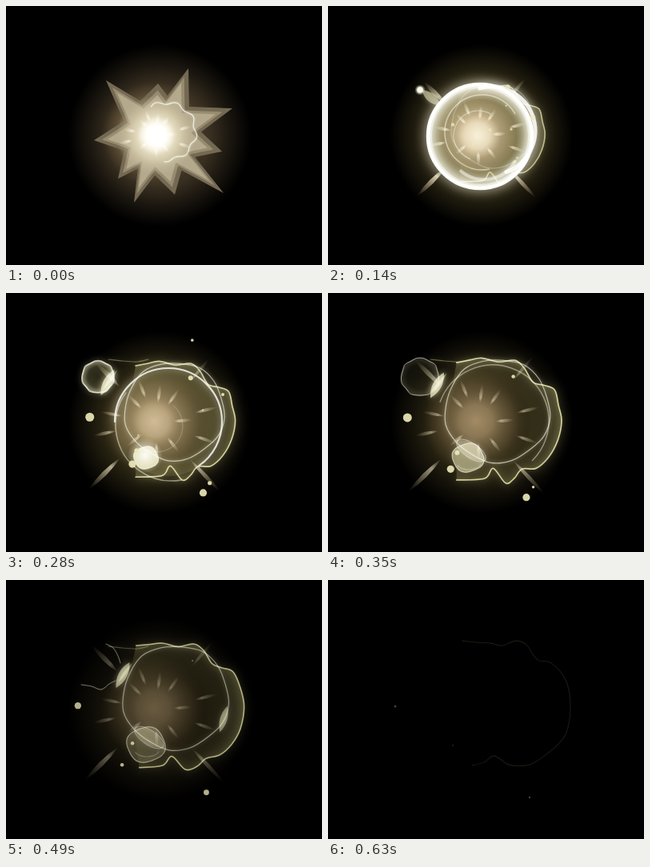
Recreate the animation shown at these times as an HTML page with a canvas. Size 395x324 px, loop 0.7 s.

```html
<!DOCTYPE html>
<html lang="en">
<head>
<meta charset="utf-8">
<title>Burst</title>
<style>
html, body { margin: 0; width: 100%; height: 100%; overflow: hidden; background: #000; }
canvas { display: block; }
</style>
</head>
<body>
<canvas id="stage" width="395" height="324"></canvas>
<script>
const g = document.getElementById('stage').getContext('2d');
const CX = 187, CY = 162, STEP = 70, STEPS = 10, TAU = Math.PI * 2;
const WHITE = '255,255,245', PALE = '245,242,205', OLIVE = '178,176,108', TAN = '205,175,130';
// Strength per step of the light and of the membrane
const FADE = [1, 1, 1, .92, .84, .72, .6, .43, .13, 0];
const LIVE = [0, 0, .75, .85, .95, .95, .9, .72, .22, 0];

const rad = d => d * Math.PI / 180;
const lerp = (a, b, t) => a + (b - a) * t;
const clamp = v => Math.min(1, Math.max(0, v));
const ramp = (k, a, b) => clamp((k - a) / (b - a));
const rgba = (c, a) => `rgba(${c},${Math.max(0, a)})`;
const around = (pts, s) => pts.map(([x, y]) => [CX + (x - CX) * s, CY + (y - CY) * s]);

// Points on a wavy ellipse, angles in degrees
function blob(x, y, rx, ry, amp, waves, from = 0, span = 360, n = 18) {
  return Array.from({ length: n }, (_, i) => {
    const a = rad(from + span * i / n), q = 1 + amp * Math.sin(waves * a);
    return [x + rx * q * Math.cos(a), y + ry * q * Math.sin(a)];
  });
}
function trace(pts, closed) {
  const n = pts.length;
  const p = i => closed ? pts[(i + n) % n] : pts[Math.min(n - 1, Math.max(0, i))];
  g.moveTo(...pts[0]);
  for (let i = 0; i < (closed ? n : n - 1); i++) {
    const [a, b, c, d] = [p(i - 1), p(i), p(i + 1), p(i + 2)];
    g.bezierCurveTo(b[0] + (c[0] - a[0]) / 6, b[1] + (c[1] - a[1]) / 6,
      c[0] - (d[0] - b[0]) / 6, c[1] - (d[1] - b[1]) / 6, c[0], c[1]);
  }
  if (closed) g.closePath();
}
function glowStroke(path, color, alpha, width, blur) {
  if (alpha <= 0) return;
  g.save();
  g.lineWidth = width;
  g.lineCap = 'round';
  g.strokeStyle = g.shadowColor = rgba(color, alpha);
  g.shadowBlur = blur;
  g.beginPath();
  path();
  g.stroke();
  g.restore();
}
const line = (pts, closed, ...style) => glowStroke(() => trace(pts, closed), ...style);
const arc = (x, y, r, a0, a1, ...style) => glowStroke(() => g.arc(x, y, r, rad(a0), rad(a1)), ...style);

// Stops are [offset, color, alpha]
function radial(x, y, r, stops) {
  const f = g.createRadialGradient(x, y, 0, x, y, r);
  stops.forEach(([o, c, a]) => f.addColorStop(o, rgba(c, a)));
  g.fillStyle = f;
  g.beginPath();
  g.arc(x, y, r, 0, TAU);
  g.fill();
}

const tips = [[125, 93], [190, 97], [228, 78], [283, 128], [270, 182],
  [272, 234], [211, 236], [160, 246], [140, 216], [110, 168]];

function spikes(s, fill) {
  const t = around(tips, s);
  g.beginPath();
  g.moveTo(...t[0]);
  t.forEach((p, i) => {
    const q = t[(i + 1) % t.length];
    const a = Math.atan2((p[1] + q[1]) / 2 - CY, (p[0] + q[0]) / 2 - CX);
    const r = (50 + 7 * Math.cos(a)) * s;
    const m = [CX + r * Math.cos(a), CY + r * Math.sin(a)];
    const bend = e => [lerp(m[0], e[0], .2), lerp(m[1], e[1], .2)];
    g.quadraticCurveTo(...bend(p), ...m);
    g.quadraticCurveTo(...bend(q), ...q);
  });
  g.fillStyle = fill;
  g.fill();
}

function star(k) {
  if (k > 1) return;
  g.save();
  g.globalAlpha = k ? .45 : 1;
  spikes(1, 'rgb(116,105,82)');
  spikes(.87, 'rgb(151,139,112)');
  spikes(.78, 'rgb(180,169,140)');
  radial(188, 162, 50, [[0, WHITE, 1], [.3, '255,249,228', .95], [.62, '225,215,184', .7], [1, '195,184,152', 0]]);
  line(blob(200, 157, 37, 36, .06, 9, -120, 220, 30), false, WHITE, .75, 1.2, 3);
  g.restore();
}

function glow(k) {
  const a = FADE[k], h = .6 * a, c = k ? '116,102,52' : '112,94,65';
  radial(192, 162, 114, [[0, c, h], [.55, c, h * .85], [.76, c, h * .42], [1, c, 0]]);
  radial(185, 160, 66, [[0, TAN, a], [.3, TAN, a * .8], [.7, '150,125,85', a * .42], [1, '100,80,50', 0]]);
  const w = k ? 1 - ramp(k, 1, 5) : 0;
  radial(186, 162, 30, [[0, '255,244,215', w], [.55, '255,240,205', w * .65], [1, TAN, 0]]);
}

function ray(deg, r0, r1, w, alpha) {
  if (alpha <= 0) return;
  g.save();
  g.translate(CX, CY);
  g.rotate(rad(deg));
  const f = g.createLinearGradient(r0, 0, r1, 0);
  f.addColorStop(0, rgba('255,242,205', 0));
  f.addColorStop(.3, rgba('255,242,205', alpha));
  f.addColorStop(1, rgba('215,190,140', 0));
  g.fillStyle = f;
  g.beginPath();
  g.moveTo(r0, 0);
  g.quadraticCurveTo((r0 + r1) / 2, -w, r1, 0);
  g.quadraticCurveTo((r0 + r1) / 2, w, r0, 0);
  g.fill();
  g.restore();
}

// Angle and inner radius
const shortRays = [[168, 50], [191, 42], [225, 24], [248, 32], [277, 24], [305, 26],
  [-4, 22], [-14, 50], [19, 50], [52, 23], [88, 24], [140, 22]];

function rays(k) {
  const a = .8 * FADE[k], t = Math.sqrt(ramp(k, 1, 6));
  if (k) {
    const r0 = lerp(50, 66, t), r1 = lerp(92, 126, t);
    ray(135, r0, r1, 6, a);
    ray(47, r0, r1, 5, a * .85);
    ray(225, r0, r1 - 12, 6, a * .8);
    ray(-50, r0 + 4, r1 - 14, 4, a * .55);
  }
  const s = lerp(.58, 1, ramp(k, 0, 4));
  shortRays.forEach(([d, r]) => ray(d, r * s, (r * 1.2 + 20) * s, 4, a * .8));
}

const rim = [[160, 85], [176, 82], [192, 79], [214, 84], [235, 82], [247, 92], [258, 110],
  [272, 114], [286, 120], [291, 140], [295, 160], [290, 185], [278, 207], [262, 221],
  [244, 222], [234, 234], [223, 240], [207, 221], [196, 234], [160, 236]];
const rimEnd = [[168, 76], [185, 78], [203, 79], [218, 82], [235, 76], [248, 81], [256, 93],
  [264, 101], [279, 104], [297, 125], [303, 155], [299, 188], [290, 203], [278, 214],
  [262, 226], [248, 232], [226, 231], [208, 220], [195, 228], [180, 232]];
const loop = blob(212, 147, 66, 65, .025, 5, 142, 360, 16);

function membrane(k) {
  if (k < 2) return;
  const s = 1 - .22 * (1 - ramp(k, 2, 6)) ** 1.5, t = ramp(k, 6, 9);
  const outer = around(rim, s).map((p, i) => p.map((v, j) => lerp(v, rimEnd[i][j], t)));
  if (k === 9) return line(outer, false, '120,120,85', .27, .8, 0);
  const inner = around(loop, Math.min(1, s + .02));
  const a = LIVE[k];
  const f = g.createRadialGradient(CX + 14, CY, 42, CX + 14, CY, 98 * s);
  f.addColorStop(0, rgba('100,95,50', 0));
  f.addColorStop(.55, rgba('120,112,65', a * .25));
  f.addColorStop(1, rgba(OLIVE, a * .5));
  g.fillStyle = f;
  g.beginPath();
  trace(outer, false);
  inner.slice(0, 4).forEach(p => g.lineTo(...p));
  g.fill();
  line(outer, false, '190,188,122', a * .9, 1.7, 11);
  line(outer, false, '215,214,155', a * .55, 1, 3);
  line(inner, true, '232,230,205', a * (k < 4 ? .4 : .72), 1.2, 4);
}

function rings(k) {
  if (k === 1 || k === 2) {
    const r = k === 1 ? 56 : 65;
    radial(190, 163, r, [[0, PALE, .5], [.4, '190,184,140', .38], [.7, '175,170,118', .4], [.9, PALE, .68], [1, WHITE, .85]]);
    arc(190, 163, r, 0, 360, WHITE, 1, 4.5, 14);
    arc(190, 163, r - 3, 0, 360, WHITE, .5, 4, 10);
    arc(204, 156, r - 10, -105, 70, WHITE, .85, 5, 12);
    arc(193, 158, r - 18, 80, 330, PALE, .55, 1.5, 5);
    arc(188, 162, r - 34, 110, 300, PALE, .45, 1.2, 4);
    arc(195, 172, r - 20, 30, 130, WHITE, .5, 4, 8);
  }
  if (k === 3) {
    radial(186, 163, 75, [[0, TAN, .15], [.5, '160,150,100', .26], [.85, '165,160,105', .33], [1, '190,188,135', .4]]);
    arc(186, 163, 75, 0, 360, PALE, .72, 1.8, 8);
    arc(190, 163, 71, 95, 260, PALE, .4, 1.2, 4);
    arc(202, 154, 58, -90, 68, WHITE, 1, 3.5, 12);
    arc(198, 158, 60, -110, 75, WHITE, .45, 2, 8);
    arc(197, 158, 50, 125, 245, WHITE, .55, 2.5, 10);
    arc(188, 166, 29, -50, 220, PALE, .4, 1.2, 4);
  }
  if (k === 4) {
    radial(203, 161, 68, [[0, TAN, .18], [.7, '150,138,90', .25], [1, '140,135,85', .18]]);
    arc(203, 161, 67, -180, 55, WHITE, .8, 2.2, 8);
    arc(207, 165, 70, 80, 215, PALE, .5, 1.5, 6);
    arc(188, 166, 33, -50, 120, PALE, .25, 1, 3);
  }
  if (k === 5) arc(206, 160, 70, -160, 45, PALE, .45, 1.5, 5);
}

function leaf(x, y, deg, len, w, alpha) {
  g.save();
  g.translate(x, y);
  g.rotate(rad(deg));
  g.fillStyle = rgba('225,222,165', alpha);
  g.shadowColor = rgba(PALE, alpha);
  g.shadowBlur = 7;
  g.beginPath();
  g.moveTo(-len, 0);
  g.quadraticCurveTo(0, -w, len, 0);
  g.quadraticCurveTo(0, w, -len, 0);
  g.fill();
  g.restore();
}

function leftBubble(k) {
  if (k < 2 || k > 8) return;
  const x = 115, y = 105, r = k < 5 ? 4 + 8 * (k - 2) : 20 + 3.5 * (k - 4);
  if (k < 4) {
    radial(x, y, r * 1.7, [[0, WHITE, 1], [.5, WHITE, .95], [.68, PALE, .45], [1, PALE, 0]]);
    leaf(129, 115, 40, 15, 11, .55);
  } else {
    const pts = blob(x, y, r, r, .035, 7);
    if (k < 6) {
      const a = k === 4 ? .5 : .18;
      radial(x, y, r, [[0, OLIVE, a * .3], [.65, OLIVE, a * .5], [1, PALE, a]]);
    } else {
      g.save();
      g.globalCompositeOperation = 'source-over';
      g.fillStyle = rgba('0,0,0', k === 6 ? .8 : .2);
      g.beginPath();
      trace(pts, true);
      g.fill();
      g.restore();
    }
    if (k === 4) line(pts, true, PALE, .75, 1.8, 7);
    else if (k < 7) line(pts, true, PALE, .5, 1, 1);
    else {
      const a = k === 7 ? .38 : .1;
      line([[125, 80], [134, 85], [140, 95], [143, 104]], false, PALE, a, 1, 1);
      line([[94, 131], [107, 133], [119, 137], [129, 130], [137, 126]], false, PALE, a, 1, 1);
    }
    const t = ramp(k, 4, 6), lx = lerp(127, 146, t), ly = lerp(112, 119, t), b = .8 * LIVE[k];
    leaf(lx, ly, -62, 18, 11, b);
    leaf(lx + 3, ly - 3, -54, 15, 4, b * .7);
  }
  if (k > 2) line([[128, 83], [145, 85], [164, 86], [178, 83]], false, OLIVE, LIVE[k] * .5, 1.2, 5);
}

function lowBubble(k) {
  if (k < 3 || k > 8) return;
  if (k === 3) {
    radial(175, 207, 17, [[0, WHITE, 1], [.35, WHITE, .8], [1, PALE, 0]]);
    line([[155, 193], [167, 204], [180, 210], [192, 217], [215, 220]], false, WHITE, .8, 3, 8);
    return;
  }
  const s = lerp(.64, 1, ramp(k, 4, 6)), b = .65 * LIVE[k];
  const pts = blob(175, 206, 24 * s, 22 * s, .05, 4);
  g.fillStyle = rgba('232,228,175', k === 4 ? .85 : FADE[k] ** 2);
  g.beginPath();
  trace(pts, true);
  g.fill();
  line(pts, true, PALE, b, 1.2, 6);
  if (k === 4) return radial(174, 203, 22, [[0, WHITE, .9], [.4, WHITE, .5], [1, PALE, 0]]);
  leaf(179, 197, 34, 23, 17, b * .5);
  glowStroke(() => g.ellipse(179, 197, 21, 9, rad(34), 0, TAU), WHITE, b * .8, 1.1, 4);
  glowStroke(() => g.ellipse(176, 213, 15, 8, 0, .2, 2.8), PALE, b * .5, 1.2, 4);
}

// Start x, y, end x, y, radius, last step
const sparks = [
  [129, 152, 84, 158, 5.5, 9], [179, 186, 140, 238, 4.6, 8], [172, 186, 156, 207, 3, 9],
  [240, 224, 252, 272, 4.6, 9], [229, 79, 236, 42, 7.4, 4], [227, 115, 234, 99, 3, 7],
  [238, 150, 253, 143, 4, 4], [246, 215, 262, 257, 3.4, 6], [264, 133, 277, 122, 8, 4],
  [175, 174, 157, 181, 4, 4]
];
const DRIFT = [0, 0, -.6, 0, .54, .66, .78, .87, .94, 1];

function drawSparks(k) {
  if (k < 2) return;
  const alpha = k > 8 ? .3 : .25 + .7 * LIVE[k];
  sparks.forEach(([x0, y0, x1, y1, size, last]) => {
    if (k > last) return;
    const r = size * (k === 2 ? .4 : Math.min(1, .25 + .25 * (last - k)));
    g.fillStyle = rgba('238,233,185', alpha);
    g.beginPath();
    g.arc(lerp(x0, x1, DRIFT[k]), lerp(y0, y1, DRIFT[k]), r, 0, TAU);
    g.fill();
  });
}

function draw(k) {
  g.globalCompositeOperation = 'source-over';
  g.fillStyle = '#000';
  g.fillRect(0, 0, 395, 324);
  glow(k);
  star(k);
  g.globalCompositeOperation = 'screen';
  membrane(k);
  rings(k);
  leftBubble(k);
  lowBubble(k);
  rays(k);
  if (k < 2) radial(188, 162, 24, [[0, WHITE, 1], [.5, WHITE, 1], [.62, WHITE, .6], [1, PALE, 0]]);
  if (k > 5) leaf(272, 174, -74, 17, 9, LIVE[k] * .65);
  g.globalCompositeOperation = 'source-over';
  drawSparks(k);
}

const start = performance.now();
function tick() {
  draw(Math.floor((performance.now() - start) / STEP) % STEPS);
  requestAnimationFrame(tick);
}
tick();
</script>
</body>
</html>
```
